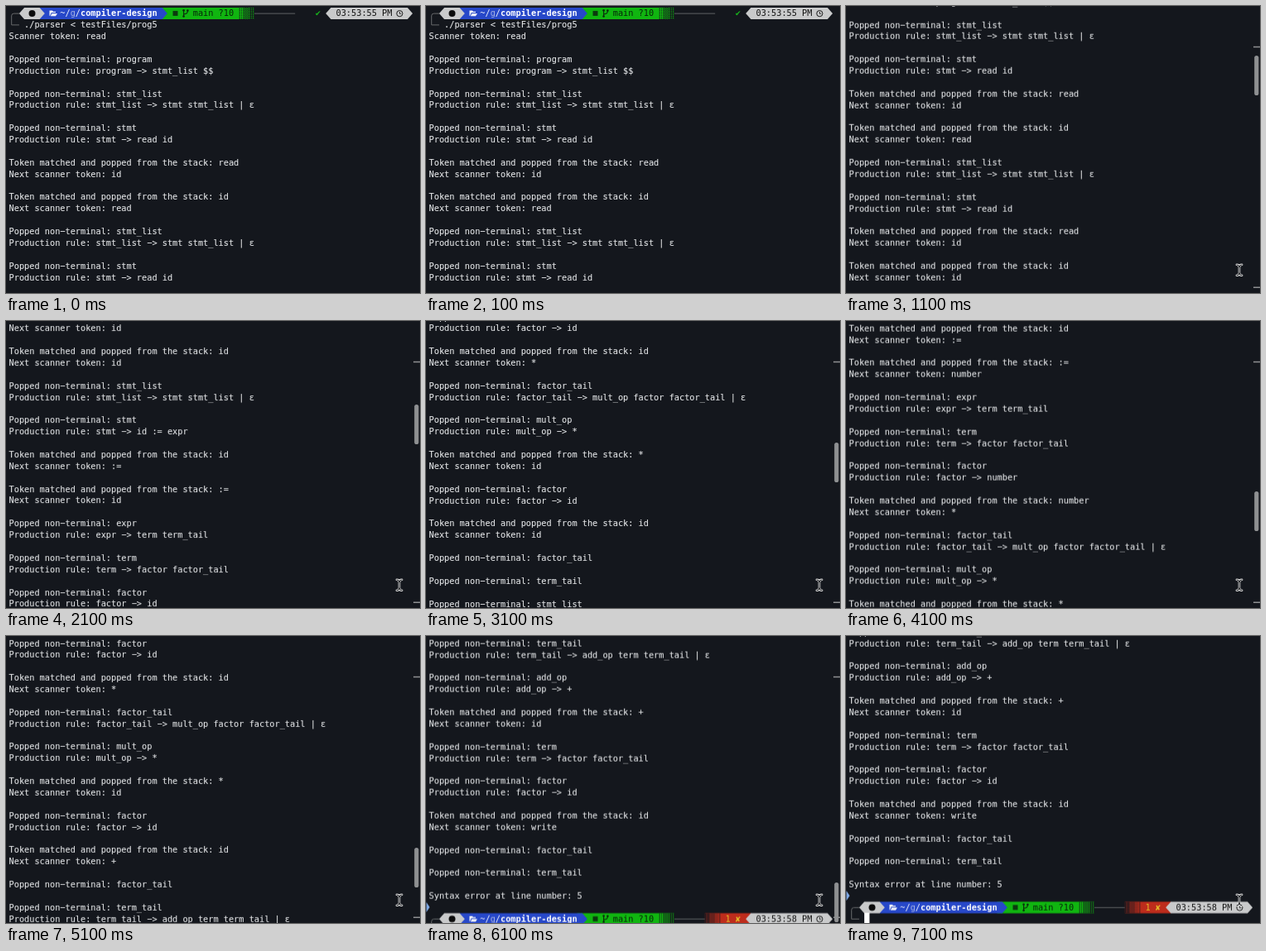
An HTML page that plays this animation: 500x347 px, repeating every 8100 ms.

```html
<!DOCTYPE html>
<html lang="en">
<head>
<meta charset="utf-8">
<title>Parser run</title>
<style>
  :root { --row: 13.88px; }
  html, body { margin: 0; width: 100%; height: 100%; overflow: hidden; background: #14171d; }
  svg { display: block; width: 500px; height: 347px; overflow: hidden; }
  text { font: 10.25px "DejaVu Sans Mono", "DejaVu Sans", monospace; }
  text.bold { font-weight: bold; }
  text.out { fill: #e2e4e6; stroke: #e2e4e6; stroke-width: 0.12px; }
  #log { animation: scroll 8100ms step-end infinite; }
  #thumb { animation: thumb 8100ms step-end infinite; }
  #bar { animation: bar 8100ms step-end infinite; }
  #mouse { animation: mouse 8100ms step-end infinite; }

  @keyframes scroll {
    0%       { transform: translateY(calc(var(--row) * 2)); }
    13.5802% { transform: translateY(calc(var(--row) * -4)); }
    25.9259% { transform: translateY(calc(var(--row) * -24)); }
    38.2716% { transform: translateY(calc(var(--row) * -48)); }
    50.6173% { transform: translateY(calc(var(--row) * -78)); }
    62.9630% { transform: translateY(calc(var(--row) * -105)); }
    75.3086% { transform: translateY(calc(var(--row) * -128)); }
    87.6543%, 100% { transform: translateY(calc(var(--row) * -129)); }
  }
  @keyframes thumb {
    0%       { transform: translateY(60px); }
    25.9259% { transform: translateY(101px); }
    38.2716% { transform: translateY(147px); }
    50.6173% { transform: translateY(206px); }
    62.9630% { transform: translateY(256px); }
    75.3086%, 100% { transform: translateY(298px); }
  }
  @keyframes bar {
    0% { opacity: 0; }
    13.5802% { opacity: 1; }
    87.6543%, 100% { opacity: 0; }
  }
  @keyframes mouse {
    0% { opacity: 0; }
    13.5802%, 100% { opacity: 1; }
  }
</style>
</head>
<body>
<svg viewBox="0 0 500 347">
  <defs>
    <g fill="#14171d">
      <pattern id="shade1" width="2" height="2" patternUnits="userSpaceOnUse"><path d="M0 0h1v1h-1z"/></pattern>
      <pattern id="shade2" width="2" height="2" patternUnits="userSpaceOnUse"><path d="M0 0h1v1h-1zM1 1h1v1h-1z"/></pattern>
      <pattern id="shade3" width="2" height="2" patternUnits="userSpaceOnUse"><path d="M0 0h2v1h-2zM1 1h1v1h-1z"/></pattern>
    </g>
    <path id="beam" d="M471.9 312.8q3.1 0 3.1 3v7q0 3 -3.1 3M478.1 312.8q-3.1 0 -3.1 3M475 322.8q0 3 3.1 3"/>
  </defs>
  <g id="log"></g>
  <g id="bar">
    <path d="M492 49.5h8M492 340.2h8" stroke="#8e9092" stroke-width="1.6"/>
    <rect id="thumb" x="493.2" width="5.2" height="48" rx="2.6" fill="#8e9092"/>
  </g>
  <g id="mouse" fill="none" stroke-linecap="round">
    <use href="#beam" stroke="#e6e6e6" stroke-width="2.6"/>
    <use href="#beam" stroke="#15171a"/>
  </g>
</svg>
<script>
const ROW = 13.88;
const log = document.getElementById('log');
const col = n => 3.6 + n * 6.171;

function add(parent, tag, attrs, content) {
  const el = document.createElementNS('http://www.w3.org/2000/svg', tag);
  for (const key in attrs) el.setAttribute(key, attrs[key]);
  if (content !== undefined) el.textContent = content;
  parent.appendChild(el);
  return el;
}

// The terminal font has a long hyphen, so the minus sign stands in for it
const write = (row, n, s) =>
  add(log, 'text', { x: col(n), y: 12.4 + row * ROW, class: 'out' }, s.replaceAll('-', '−'));

// Grammar of the small calculator language
const production = (symbol, token) => ({
  program: 'stmt_list $$',
  stmt_list: 'stmt stmt_list',
  stmt: token === 'read' ? 'read id' : 'id := expr',
  expr: 'term term_tail',
  term_tail: token === '+' ? 'add_op term term_tail' : '',
  term: 'factor factor_tail',
  factor_tail: token === '*' ? 'mult_op factor factor_tail' : '',
  add_op: token,
  mult_op: token,
  factor: token
})[symbol];

// Table-driven parse that records its trace
function trace(source) {
  const tokens = source.split(' ');
  const stack = ['program'];
  const lines = ['Scanner token: ' + tokens[0]];
  while (!(tokens[0] === 'write' && stack[0] === 'stmt_list')) {
    const top = stack.shift();
    const rule = production(top, tokens[0]);
    lines.push('');
    if (rule === undefined) {
      tokens.shift();
      lines.push('Token matched and popped from the stack: ' + top, 'Next scanner token: ' + tokens[0]);
      continue;
    }
    lines.push('Popped non-terminal: ' + top);
    if (rule) {
      const optional = /_list|_tail/.test(top) ? ' | ε' : '';
      lines.push(`Production rule: ${top} -> ${rule}${optional}`);
      stack.unshift(...rule.split(' '));
    }
  }
  return lines.concat('', 'Syntax error at line number: 5');
}

function prompt(row, time, failed) {
  const g = add(log, 'g', { transform: `translate(0 ${8.9 + row * ROW})` });
  const line = (d, stroke, width = 1) => add(g, 'path', { d, stroke, 'stroke-width': width, fill: 'none' });
  const label = (n, s, fill, cls = '') => add(g, 'text', { x: col(n), y: 3.5, fill, class: cls }, s);
  const shape = (d, fill) => add(g, 'path', { d, fill });

  // Bar between two columns, with optional arrow tips one column wide
  const segment = (from, to, fill, left = 0, right = 0) =>
    shape(`M${col(from)} -7H${col(to)}L${col(to + right)} 0L${col(to)} 7H${col(from)}L${col(from - left)} 0Z`, fill);

  const fade = (from, color, shades) => shades.forEach((shade, i) => {
    segment(from + i, from + i + 1, color);
    segment(from + i, from + i + 1, `url(#shade${shade})`);
  });

  line(`M${col(2)} 0.2H9.5Q6.7 0.2 6.7 3V14H${col(2)}`, '#686a6c');
  line(`M${col(48)} 0.2H${failed ? col(54) : col(56)}`, '#606366');

  segment(29, 45, '#10b510');
  segment(6, 30, '#2748c9', 0, 1);
  segment(3, 6, '#c9cacb', 1, 1);
  fade(45, '#10b510', [1, 2, 3]);

  add(g, 'circle', { cx: 31.5, cy: 0, r: 4, fill: '#0c0c0c' });
  shape('M52.5 -3.5H56L57 -2.2H60V-0.8H54.8L53 3.2H52.5ZM55.4 0H62L60 3.4H53.8Z', '#f2f4fa');
  label(10, '~/', '#e9edfb');
  label(12, 'g', '#a4b0e2');
  label(13, '/', '#e9edfb');
  label(14, 'compiler-design', '#fff', 'bold');

  shape('M201.5 -3H207.5V3H201.5Z', '#0b3a0e');
  line('M214.6 -3V3M219.4 -3Q219.4 0.6 214.6 1', '#0b2a0c', 1.1);
  for (const [cx, cy] of [[214.6, -3.6], [214.6, 3.6], [219.4, -3.4]])
    add(g, 'circle', { cx, cy, r: 1.3, fill: '#0b2a0c' });
  label(36, 'main ?10', '#07250a');

  if (failed) {
    fade(54, '#bd2c1c', [3, 2, 1]);
    segment(57, 63, '#bd2c1c');
    label(58, '1', '#e6c228');
    label(60, '✘', '#e6c228');
  } else {
    label(60, '✔', '#18b41c');
  }
  segment(63, 78, '#c9cacb', 1, 1);
  label(64, time, '#141414');
  add(g, 'circle', { cx: 475.4, cy: 0.2, r: 3.6, fill: 'none', stroke: '#1a1a1a', 'stroke-width': 1 });
  line('M475.4 -2V0.4H477.2', '#1a1a1a', 0.9);
}

prompt(-2, '03:53:55 PM', false);
write(-1, 3, './parser < testFiles/prog5');

const lines = trace('read id read id id := id * id id := number * id * id + id write');
lines.forEach((s, i) => s && write(i, 0, s));

const end = lines.length;
add(log, 'path', { d: `M0.5 ${2.5 + end * ROW}l4 6l-4 6z`, fill: '#7fa9e6' });
prompt(end + 1, '03:53:58 PM', true);
add(log, 'rect', { x: col(3), y: 1.5 + (end + 2) * ROW, width: 6.3, height: ROW, fill: '#fff' });
</script>
</body>
</html>
```
